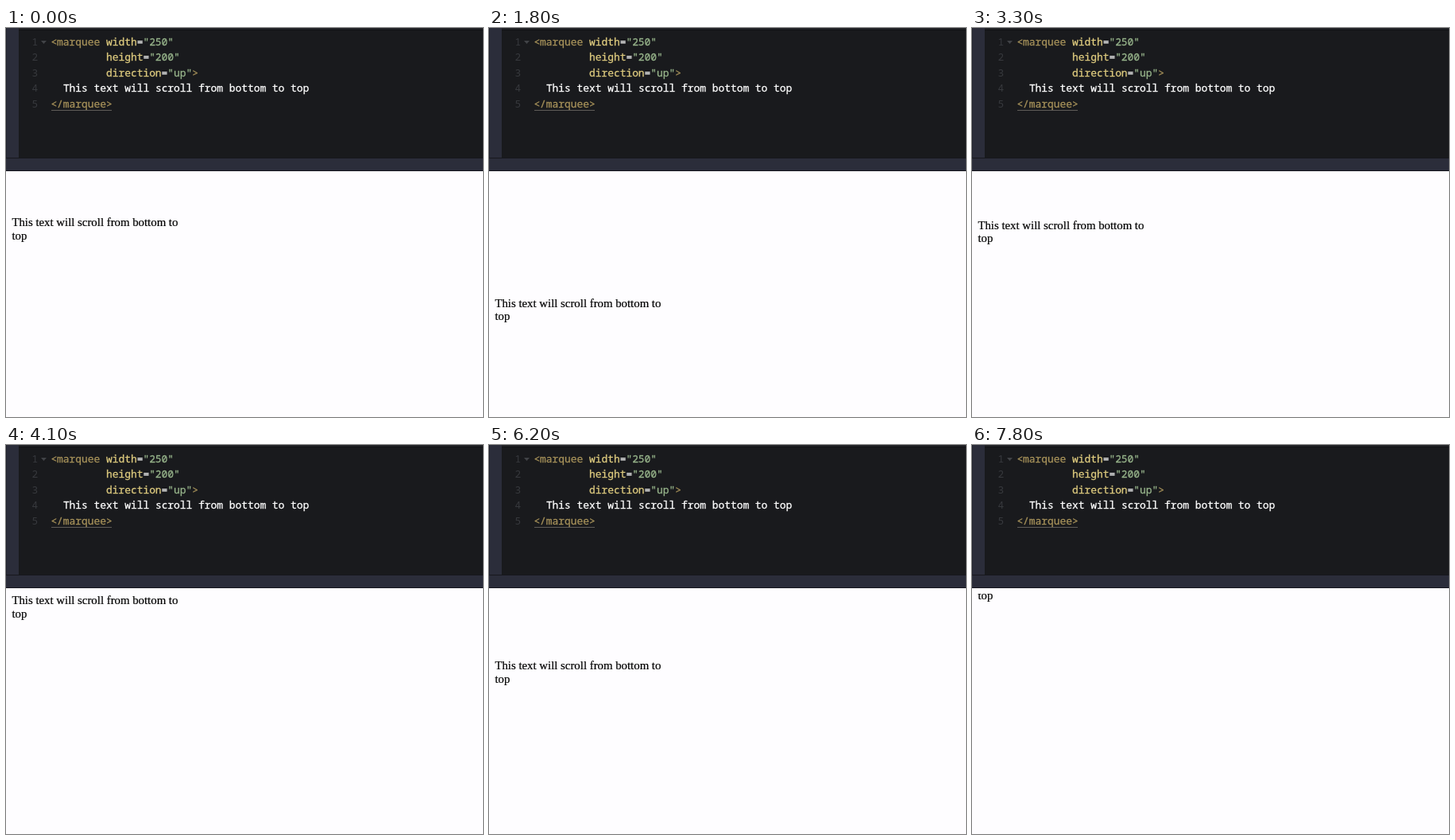
These frames come from a looping animation (600 px wide and 489 px high, 7900 ms). An HTML page:

```html
<!DOCTYPE html>
<html lang="en">
<head>
<meta charset="utf-8">
<title>Upward marquee</title>
<style>
  html, body { margin: 0; height: 100%; overflow: hidden; background: #fefdff; }
  svg { display: block; }
  .code { font: 12.9px "Noto Sans Mono", "DejaVu Sans Mono", monospace; }
  .code text { fill: #fff; stroke: #fff; stroke-width: .3px; }
  .code .num { fill: #37393d; stroke: none; }
  .code .tag { fill: #a7925a; stroke: #a7925a; }
  .code .attr { fill: #ddca7e; stroke: #ddca7e; }
  .code .str { fill: #96b38a; stroke: #96b38a; }
  .page { font: 14.82px "Liberation Serif", "Times New Roman", serif; fill: #000; stroke: #000; stroke-width: .2px; }
</style>
</head>
<body>
<svg width="600" height="489" viewBox="0 0 600 489">
  <clipPath id="box"><rect x="7" y="187" width="232" height="185"/></clipPath>

  <!-- editor pane with its gutter and divider -->
  <rect width="600" height="180" fill="#191a1d"/>
  <rect x="16" width="584" height="2" fill="#222327"/>
  <rect x="16" y="2" width="584" height="1" fill="#111214"/>
  <rect width="16" height="164" fill="#2b2d3a"/>
  <rect width="1" height="164" fill="#20222c"/>
  <rect y="164" width="600" height="15" fill="#2b2d3a"/>
  <rect y="163" width="600" height="1" fill="#17181d"/>
  <rect y="179" width="600" height="1" fill="#15161d"/>
  <path d="M44 16h7l-3.5 4z" fill="#414347"/>

  <g class="code">
    <g id="nums"></g>
    <text x="56.4" y="22"><tspan class="tag">&lt;marquee</tspan> <tspan class="attr">width</tspan>=<tspan class="str">"250"</tspan></text>
    <text x="126" y="41.4"><tspan class="attr">height</tspan>=<tspan class="str">"200"</tspan></text>
    <text x="126" y="60.8"><tspan class="attr">direction</tspan>=<tspan class="str">"up"</tspan><tspan class="tag">&gt;</tspan></text>
    <text x="71.9" y="80.2">This text will scroll from bottom to top</text>
    <text x="56.4" y="99.6" class="tag">&lt;/marquee&gt;</text>
  </g>
  <rect x="57" y="103" width="76" height="1" fill="#5f5c58"/>

  <g clip-path="url(#box)">
    <g id="scroll" class="page">
      <text x="7.4" y="0">This text will scroll from bottom to</text>
      <text x="7.4" y="16.7">top</text>
    </g>
  </g>
</svg>
<script>
  const LOOP = 7900, STEP = 100;
  const SPEED = 0.0654;               // px per ms
  const START = 249.1, EXIT = 166.3;  // baselines of the first line
  const TRAVEL = 219.25;

  const scroll = document.getElementById('scroll');
  document.getElementById('nums').innerHTML = [1, 2, 3, 4, 5]
    .map(n => `<text class="num" x="32.6" y="${22 + (n - 1) * 19.4}">${n}</text>`).join('');

  function draw(now) {
    const t = Math.floor(now % LOOP / STEP) * STEP;
    const y = START - EXIT - SPEED * t;
    const wrapped = (y % TRAVEL + TRAVEL) % TRAVEL + EXIT;
    scroll.setAttribute('transform', `translate(0 ${wrapped.toFixed(2)})`);
  }

  const begin = performance.now();
  function tick() {
    draw(performance.now() - begin);
    requestAnimationFrame(tick);
  }
  tick();
</script>
</body>
</html>
```
